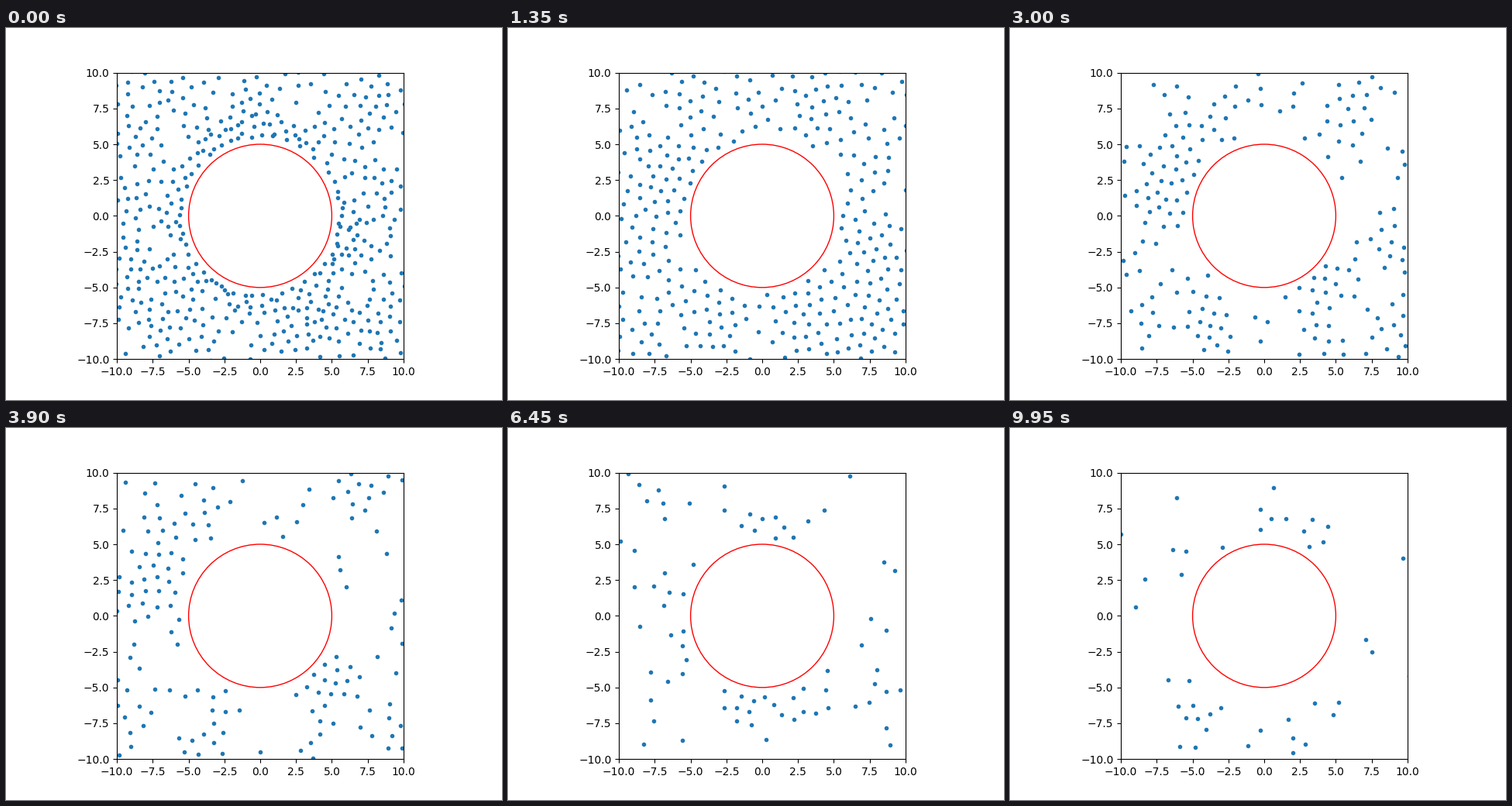
Animation, 640 px wide and 480 px high, one loop 10000 ms. Source, as a matplotlib script:

```python
import numpy as np
import matplotlib.pyplot as plt
from matplotlib.animation import FuncAnimation
from matplotlib.patches import Circle

FRAMES, INTERVAL = 200, 50
HALF = 10.0            # half width of the box
RADIUS = 5.0           # obstacle
SPACING = 1.0          # distance the dots keep from each other
RIM = RADIUS + SPACING / 2
SPEED, NOISE, ALIGN = 0.09, 0.027, 0.12


def length(a):
    return np.sqrt((a ** 2).sum(axis=-1, keepdims=True)) + 1e-9


def target_count(frame):
    """The crowd thins out exponentially."""
    return 30 + 415 * np.exp(-frame / 58)


def separate(pos):
    """Push close dots apart, then bounce them off the obstacle."""
    diff = pos[:, None] - pos[None]
    dist = length(diff)
    overlap = np.clip(SPACING - dist, 0, None)
    pos = pos + 0.35 * (diff / dist * overlap).sum(axis=1)
    r = length(pos)
    return pos * (1 + 1.5 * np.clip(RIM - r, 0, None) / r)


def steer(pos, vel, rng):
    """Follow the neighbours' heading, with noise, at constant speed."""
    near = (length(pos[:, None] - pos[None])[..., 0] < 1.6).astype(float)
    mean = near @ vel / near.sum(axis=1, keepdims=True)
    vel = vel + ALIGN * (mean - vel) + rng.normal(0, NOISE, vel.shape)
    normal = pos / length(pos)
    inward = np.minimum((vel * normal).sum(axis=1, keepdims=True), 0)
    vel = vel - 2 * inward * normal * (length(pos) < RIM + 0.1)
    return SPEED * vel / length(vel)


def simulate():
    rng = np.random.default_rng(7)
    pos = rng.uniform(-HALF, HALF, (520, 2))
    pos = pos[length(pos)[:, 0] > RADIUS - 0.8]
    vel = rng.normal(0, SPEED, pos.shape)
    for _ in range(2):
        pos = separate(pos)

    history = []
    for frame in range(FRAMES):
        inside = (np.abs(pos) < HALF + 0.12).all(axis=1)
        pos, vel = pos[inside], vel[inside]
        history.append(pos)

        # Outer dots drift out faster while the box is too full
        excess = len(pos) / target_count(frame + 1) - 1
        r = length(pos)
        drift = np.clip(excess, -0.15, 0.15) * np.clip((r - RIM) / 5, 0, 1)
        vel = steer(pos, vel, rng)
        pos = separate(pos + vel + drift * pos / r)
    return history


history = simulate()

fig, ax = plt.subplots(figsize=(6.4, 4.8), dpi=100)
ax.set_aspect("equal")
ax.set_xlim(-HALF, HALF)
ax.set_ylim(-HALF, HALF)
ticks = np.arange(-HALF, HALF + 1, 2.5)
ax.set_xticks(ticks)
ax.set_yticks(ticks)
ax.add_patch(Circle((0, 0), RADIUS, fill=False, edgecolor="red", linewidth=1))
dots, = ax.plot([], [], "o", color="C0", markersize=3)


def update(frame):
    dots.set_data(*history[frame].T)
    return dots,


anim = FuncAnimation(fig, update, frames=FRAMES, interval=INTERVAL, repeat=True)
plt.show()
```
